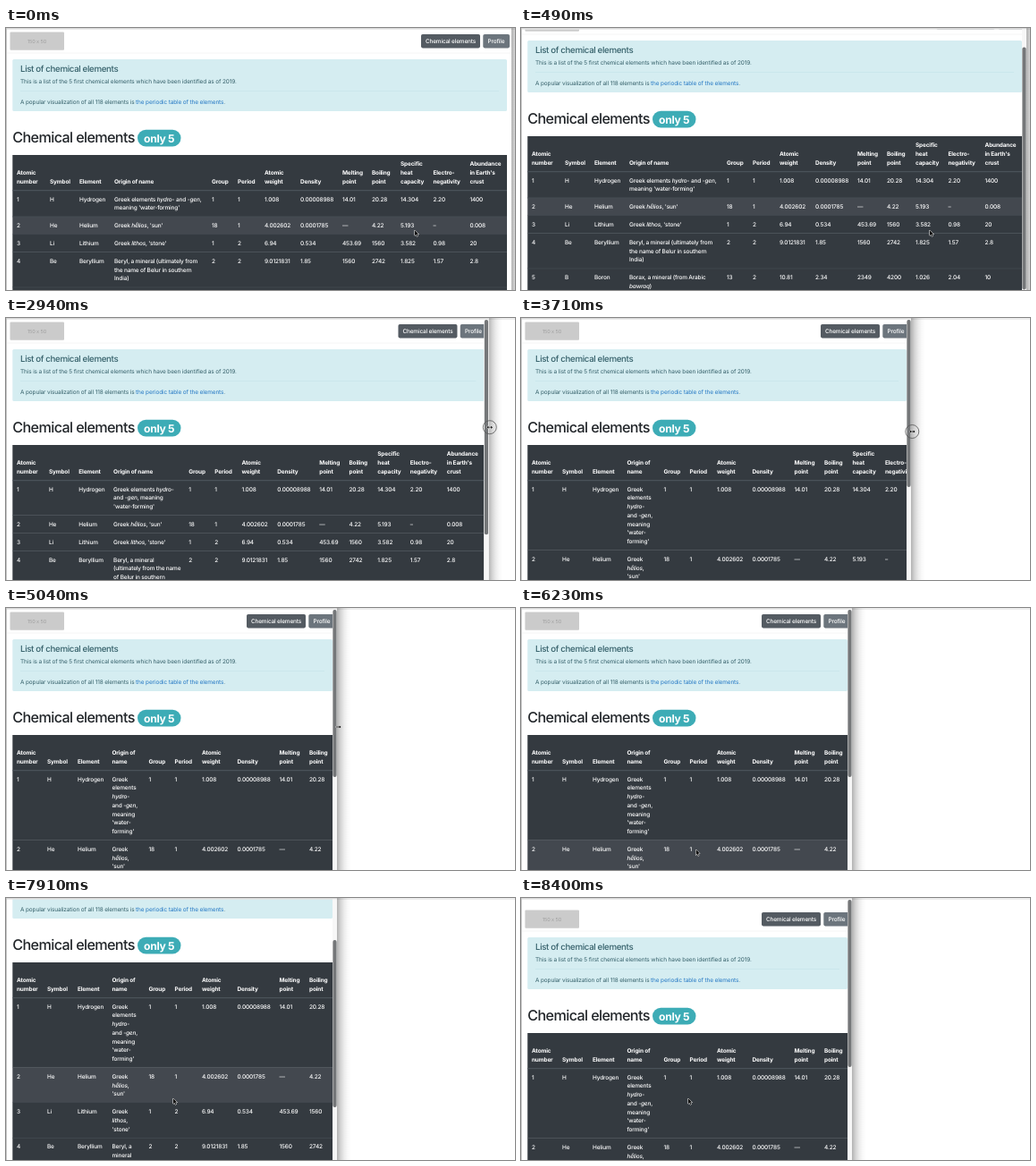
Animation of 569 by 293 pixels, one loop 8.47 s. Source, as an HTML page with a canvas:

```html
<!DOCTYPE html>
<html lang="en">
<head>
<meta charset="utf-8">
<title>Responsive table</title>
<style>
html, body { margin: 0; width: 100%; height: 100%; overflow: hidden; background: #fff; }
canvas { display: block; width: 569px; height: 293px; }
</style>
</head>
<body>
<canvas id="stage"></canvas>
<script>
const STAGE_W = 569, STAGE_H = 293, LOOP = 8470, STEP = 70;
const REM = 6.48, LINE = 9.72, PAD = 4.86, RULE = 0.4;
const canvas = document.getElementById('stage');
const ctx = canvas.getContext('2d');
const dpr = window.devicePixelRatio || 1;
canvas.width = STAGE_W * dpr;
canvas.height = STAGE_H * dpr;

const head = ['Atomic\nnumber', 'Symbol', 'Element', 'Origin of name', 'Group', 'Period', 'Atomic\nweight',
  'Density', 'Melting\npoint', 'Boiling\npoint', 'Specific\nheat\ncapacity', 'Electro-\nnegativity',
  "Abundance\nin Earth's\ncrust"];
// _text_ is italic, | is a break opportunity
const rows = [
  "1;H;Hydrogen;Greek elements _hydro_- and _-gen_, meaning 'water-|forming';1;1;1.008;0.00008988;14.01;20.28;14.304;2.20;1400",
  "2;He;Helium;Greek _hḗlios_, 'sun';18;1;4.002602;0.0001785;—;4.22;5.193;–;0.008",
  "3;Li;Lithium;Greek _lithos_, 'stone';1;2;6.94;0.534;453.69;1560;3.582;0.98;20",
  "4;Be;Beryllium;Beryl, a mineral (ultimately from the name of Belur in southern India);2;2;9.0121831;1.85;1560;2742;1.825;1.57;2.8",
  "5;B;Boron;Borax, a mineral (from Arabic _bawraq_);13;2;10.81;2.34;2349;4200;1.026;2.04;10"
].map(r => r.split(';'));
const wideCols = [12, 49, 82, 121, 230, 259, 289, 329, 376, 409, 441, 477.5, 518.5];
const slimCols = [12, 46, 80, 118.5, 159.5, 188.5, 219, 258.5, 305.5, 339, 370.5, 407, 448];

// Keyframes: time, value
const WIDTH = [[2750, 565], [3710, 436], [4620, 396], [4970, 370]];
const SCROLL = [[0, 0], [420, 21], [910, 21], [1190, 0], [7280, 0], [7350, 2], [7700, 70], [7910, 70], [8260, 0], [8400, -9]];
const MOUSE_X = [[1050, 457], [1400, 566], [5250, 371], [5800, 230], [6300, 190], [6900, 187]];
const MOUSE_Y = [[1050, 226], [1400, 121], [2750, 121], [3710, 127], [4970, 133], [5250, 133], [5800, 240], [6300, 275], [6900, 224]];

const lerp = (a, b, k) => a + (b - a) * k;

function track(keys, t) {
  if (t <= keys[0][0]) return keys[0][1];
  for (let i = 1; i < keys.length; i++) {
    const [t0, a] = keys[i - 1], [t1, b] = keys[i];
    if (t <= t1) return lerp(a, b, (t - t0) / (t1 - t0));
  }
  return keys[keys.length - 1][1];
}

function setFont(size, weight = 400, italic = false, tracking = -0.025) {
  ctx.font = `${italic ? 'italic ' : ''}${weight} ${size}px Inter, "Open Sans", sans-serif`;
  ctx.letterSpacing = size * tracking + 'px';
}

// Draws a line (or only measures it) and returns its width
function text(s, x, y, size, weight, color, tracking) {
  let w = 0;
  s.split('_').forEach((part, i) => {
    setFont(size, weight, i % 2 === 1, tracking);
    if (color) {
      ctx.fillStyle = color;
      ctx.fillText(part, x + w, y);
    }
    w += ctx.measureText(part).width;
  });
  return w;
}

function centered(s, x, y, size, weight, color) {
  text(s, x - text(s, 0, 0, size, weight) / 2, y, size, weight, color);
}

function wrap(s, max, weight) {
  const clean = l => l.replace(/\|/g, '').trimEnd();
  const lines = [];
  let line = '';
  for (const part of s.split(/(?<=[ |])/)) {
    if (line && text(clean(line + part), 0, 0, REM, weight) > max) {
      lines.push(clean(line));
      line = '';
    }
    line += part;
  }
  return [...lines, clean(line)];
}

function box(x, y, w, h, color, r = 0) {
  ctx.fillStyle = color;
  ctx.beginPath();
  ctx.roundRect(x, y, w, h, r);
  ctx.fill();
}

function drawTop(W) {
  box(4.5, 4.5, 60.5, 20.3, '#cbcbcb', 1);
  centered('150 x 50', 34.5, 17, 5.6, 400, '#a0a0a0');
  box(1, 27.8, W, 0.5, '#ececec');
  box(W - 101, 7, 66, 15.4, '#545b62', 1.8);
  centered('Chemical elements', W - 68, 17.1, REM, 500, '#fff');
  box(W - 31.7, 7, 29.7, 15.4, '#6c757d', 1.8);
  centered('Profile', W - 17, 17.1, REM, 500, '#fff');

  const ink = '#35606a';
  box(7.3, 35, W - 12.3, 58, '#d5edf1', 1.6);
  text('List of chemical elements', 16, 49.4, 9.72, 500, ink, -0.037);
  text('This is a list of the 5 first chemical elements which have been identified as of 2019.', 16, 61.6, REM, 400, ink, -0.02);
  box(16, 70.3, W - 30, 0.5, '#bfe2e8');
  let x = 16;
  for (const [s, color] of [['A popular visualization of all 118 elements is ', ink],
    ['the periodic table of the elements', '#2478c4'], ['.', ink]])
    x += text(s, x, 84.8, REM, 400, color, -0.02);

  text('Chemical elements', 7.3, 128, 16.2, 500, '#212529', -0.04);
  box(147, 113.8, 48.5, 18.6, '#3dacb6', 9.3);
  centered('only 5', 171.2, 127.7, 12.15, 700, '#fff');
}

function drawTable(W, hoverAt, hoverRow) {
  const k = Math.min(1, (565 - W) / 70);
  const cols = wideCols.map((x, i) => lerp(x, slimCols[i], k));
  const right = lerp(560, 490, k), limit = lerp(101, 30.5, k);
  const layout = (cells, weight) =>
    cells.map((c, i) => i === 3 ? wrap(c, limit, weight) : c.split('\n'));
  let y = 142;

  function drawRow(cells, weight, isHead, index) {
    const blocks = layout(cells, weight);
    const count = Math.max(...blocks.map(b => b.length));
    const h = count * LINE + PAD * 2 + RULE;
    const hovered = !isHead && (hoverRow === index || hoverAt >= y && hoverAt < y + h);
    box(7.3, y, right - 7.3, h + 0.3, hovered ? '#43484f' : '#343a40');
    if (!isHead) box(7.3, y, right - 7.3, index ? RULE : 0.9, '#4a525a');
    blocks.forEach((lines, i) => lines.forEach((s, n) => {
      const row = isHead ? n + count - lines.length : n;
      text(s, cols[i], y + RULE + PAD + LINE * (row + 0.5) + 2.3, REM, weight, '#fff');
    }));
    y += h;
  }

  drawRow(head, 700, true);
  rows.forEach((r, i) => drawRow(r, 500, false, i));
}

function outline(points, fill, edge) {
  ctx.beginPath();
  points.forEach(([x, y]) => ctx.lineTo(x, y));
  ctx.closePath();
  ctx.lineWidth = 1;
  ctx.strokeStyle = edge;
  ctx.stroke();
  ctx.fillStyle = fill;
  ctx.fill();
}

function drawMouse(x, y, mode, ring) {
  ctx.save();
  ctx.translate(x, y);
  if (mode === 'arrow') {
    outline([[0, 0], [0, 6.2], [1.4, 5], [2.3, 7.1], [3.3, 6.7], [2.4, 4.6], [4.3, 4.5]], '#111', '#fff');
  } else {
    const tip = [[0.5, -0.4], [1.4, -0.4], [1.4, -1.7], [3.3, 0], [1.4, 1.7], [1.4, 0.4], [0.5, 0.4]];
    const flip = tip.map(([a, b]) => [-a, -b]);
    const tail = [[-2.8, 0.4], [-2.8, -0.4]];
    outline([...tip, ...(mode === 'right' ? tail : flip)], '#111', '#fff');
    if (ring) {
      ctx.beginPath();
      ctx.arc(0, 0, 7.5, 0, 7);
      ctx.lineWidth = 0.8;
      ctx.strokeStyle = '#555';
      ctx.stroke();
    }
  }
  ctx.restore();
}

function draw(t) {
  const W = track(WIDTH, t), scroll = track(SCROLL, t);
  const onEdge = t >= 1400 && t <= 5250;
  const bar = t >= 140;
  const mx = onEdge ? W + 1.3 : track(MOUSE_X, t), my = track(MOUSE_Y, t);

  ctx.setTransform(dpr, 0, 0, dpr, 0, 0);
  box(0, 0, STAGE_W, STAGE_H, '#fff');
  box(0, 0, STAGE_W, 2, '#ededed');
  const shade = ctx.createLinearGradient(W, 0, W + 16, 0);
  [0.3, 0.17, 0.08, 0.025, 0].forEach((a, i) => shade.addColorStop(i / 4, `rgba(0,0,0,${a})`));
  box(W, 0, 16, STAGE_H, shade);
  box(0, 0, W, STAGE_H, '#fff');

  ctx.save();
  ctx.beginPath();
  ctx.rect(1, 1.5, W - (bar ? 6 : 1), STAGE_H);
  ctx.clip();
  ctx.translate(0, -scroll);
  drawTop(W);
  const live = t >= 980 && t <= 8190 && mx < W - 5;
  drawTable(W, live ? my + scroll : -1, t < 980 ? 1 : -1);
  ctx.restore();

  box(0, 0, W, 1.5, '#d9d9d9');
  box(0, 0, 1, STAGE_H, '#c4c4c4');
  if (bar) {
    const len = lerp(271, 187, Math.min(1, (565 - W) / 70));
    box(W - 5, 1.5, 5, STAGE_H, '#f7f7f7');
    box(W - 4.6, 2 + Math.max(0, scroll) * len / 291, 4.2, len, '#757779', 2);
  }
  drawMouse(mx, my, !onEdge ? 'arrow' : t > 4970 ? 'right' : 'both', t > 2700 && t < 4970);
}

function tick(now) {
  draw(Math.floor(now % LOOP / STEP) * STEP);
  requestAnimationFrame(tick);
}
ctx.textRendering = 'geometricPrecision';
requestAnimationFrame(tick);
</script>
</body>
</html>
```
